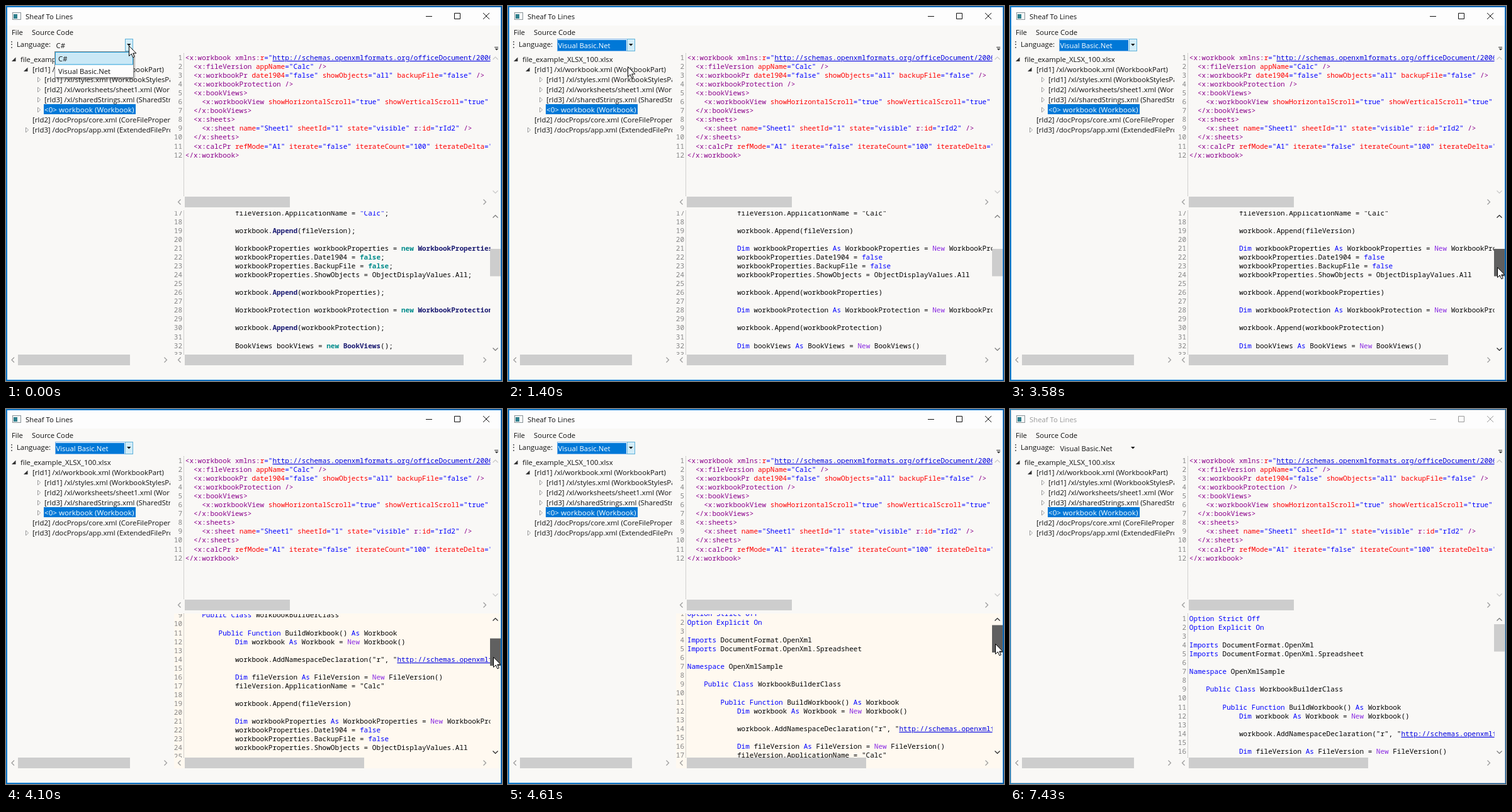
An HTML page for the animation above (7.53 s loop, 788 by 596 pixels).

```html
<!DOCTYPE html>
<html lang="en">
<head>
<meta charset="utf-8">
<title>Sheaf To Lines</title>
<style>
  html, body { margin: 0; width: 100%; height: 100%; overflow: hidden; }
  svg { display: block; width: 788px; height: 596px; }
  text { white-space: pre; }
  .ui { font: 11.3px "Open Sans", "Noto Sans", sans-serif; }
  .code { font: 11px "Noto Sans Mono", "DejaVu Sans Mono", monospace; }
  .num { fill: #858585; text-anchor: end; }
</style>
</head>
<body>
<svg id="stage" viewBox="0 0 788 596" xmlns="http://www.w3.org/2000/svg">
  <defs>
    <linearGradient id="edge" x2="1" y2="0">
      <stop offset="0" stop-color="#0a78bd"/>
      <stop offset="1" stop-color="#0b4f8c"/>
    </linearGradient>
    <clipPath id="treeClip"><path d="M2 75H261V554H2z"/></clipPath>
    <clipPath id="xmlClip"><path d="M262 75H769.5V303H262z"/></clipPath>
    <clipPath id="codeClip"><path d="M262 326H769.5V554H262z"/></clipPath>
  </defs>
</svg>
<script>
const LOOP = 7530, LINE = 14.05, BG = '#f9f8f6', THUMB = '#cdcdcd';
const stage = document.getElementById('stage');

function add(parent, tag, attrs = {}, content) {
  const el = document.createElementNS(stage.namespaceURI, tag);
  for (const k in attrs) el.setAttribute(k, attrs[k]);
  if (content !== undefined) el.textContent = content;
  parent.appendChild(el);
  return el;
}
const group = (parent, attrs) => add(parent, 'g', attrs);
const rect = (parent, x, y, width, height, fill, extra) =>
  add(parent, 'rect', { x, y, width, height, fill, ...extra });
const path = (parent, d, fill = 'none', stroke = 'none', extra) =>
  add(parent, 'path', { d, fill, stroke, ...extra });
const label = (parent, x, y, s, fill = '#111', extra) =>
  add(parent, 'text', { x, y, fill, class: 'ui', ...extra }, s);
const show = (el, on) => el.setAttribute('display', on ? 'inline' : 'none');

// Syntax colouring: the first matching rule in each list wins.
const LINK = ['http:[^"]*', '#0000e0', 'link'];
const xmlRules = [
  LINK,
  ['"(?!http)[^"]*"|["=]', '#0000ff'],
  ['[\\w.-]+(?=\\s*=)', '#ff0000'],
  ['[^\\s"=]+?(?=[\\s:]|$)|[^\\s"=]', '#8b008b']
];
const vbRules = [
  LINK,
  ['\\bNew\\b', '#8a2be2'],
  ['\\b(?:Option|Strict|Explicit|Off|On|Imports|Namespace|Public|Class|Function|As|Dim|false)\\b', '#0000ff']
];
const csRules = [
  ['"[^"]*"', '#0000ff'],
  ['\\b(?:new|false)\\b', '#008b8b', 'bold'],
  ['\\w+(?=\\()', '#191970', 'bold']
];

function codeLine(parent, s, y, rules) {
  const text = add(parent, 'text', { x: 284.8, y, class: 'code', fill: '#000' });
  const re = new RegExp(rules.map(r => `(${r[0]})`).join('|'), 'g');
  let end = 0;
  for (const m of s.matchAll(re)) {
    if (m.index > end) add(text, 'tspan', {}, s.slice(end, m.index));
    const [, fill, kind] = rules[m.slice(1).findIndex(Boolean)];
    const style = kind === 'link' ? { 'text-decoration': 'underline' }
      : kind === 'bold' ? { 'font-weight': 700 } : {};
    add(text, 'tspan', { fill, ...style }, m[0]);
    end = m.index + m[0].length;
  }
  if (end < s.length) add(text, 'tspan', {}, s.slice(end));
}
function listing(parent, lines, y0, rules, first = 1) {
  lines.forEach((s, i) => {
    const y = Math.round(y0 + (first - 1 + i) * LINE);
    add(parent, 'text', { x: 280, y, class: 'code num' }, first + i);
    if (s) codeLine(parent, s, y, rules);
  });
}

// Window frame, title bar and menu
rect(stage, 0, 0, 788, 596, 'url(#edge)');
const frame = rect(stage, 1, 1, 786, 594, '#0078d7');
rect(stage, 2, 2, 784, 592, BG);
rect(stage, 2, 2, 784, 29, '#fdfdfd');
rect(stage, 10.5, 10.5, 13, 11, '#f4f6f6', { stroke: '#8a9499' });
rect(stage, 12, 13, 6, 7, '#2f7f8c');
const title = label(stage, 31, 20.5, 'Sheaf To Lines');
const buttons = path(stage, 'M667 16.5H677M712.5 11.5H721.5V20.5H712.5zM758 11L768 21M768 11L758 21');
label(stage, 9, 46, 'File');
label(stage, 41, 46, 'Source Code');

// Toolbar
for (const y of [56, 60, 65]) rect(stage, 8, y, 2, 2, '#777');
label(stage, 17, 65, 'Language:');
path(stage, 'M776 65.5H782', 'none', '#333');
path(stage, 'M776.5 67.5H782.5L779.5 70.5z', '#333');

// Document tree
const tree = group(stage, { 'clip-path': 'url(#treeClip)' });
rect(tree, 60, 156, 146, 16, '#0078d7');
[
  [0, 1, 'file_example_XLSX_100.xlsx'],
  [1, 1, '[rId1] /xl/workbook.xml (WorkbookPart)'],
  [2, 0, '[rId1] /xl/styles.xml (WorkbookStylesPart)'],
  [2, 0, '[rId2] /xl/worksheets/sheet1.xml (WorksheetPart)'],
  [2, 0, '[rId3] /xl/sharedStrings.xml (SharedStringTablePart)'],
  [2, 0, '<0> workbook (Workbook)'],
  [1, -1, '[rId2] /docProps/core.xml (CoreFilePropertiesPart)'],
  [1, 0, '[rId3] /docProps/app.xml (ExtendedFilePropertiesPart)']
].forEach(([depth, open, s], i) => {
  const x = 23 + depth * 19, y = 89 + i * 16, picked = i === 5;
  label(tree, x, y, s, picked ? '#fff' : '#111', picked ? { style: 'font-size:11.6px' } : {});
  if (open > 0) path(tree, `M${x - 7.5} ${y - 7.5}v6.5h-6.5z`, '#333');
  if (open === 0) path(tree, `M${x - 10.5} ${y - 8}v8l4 -4z`, '#fff', '#999');
});

// XML pane
const xml = group(stage, { 'clip-path': 'url(#xmlClip)' });
listing(xml, [
  '<x:workbook xmlns:r="http://schemas.openxmlformats.org/officeDocument/2006/relationships"',
  '  <x:fileVersion appName="Calc" />',
  '  <x:workbookPr date1904="false" showObjects="all" backupFile="false" />',
  '  <x:workbookProtection />',
  '  <x:bookViews>',
  '    <x:workbookView showHorizontalScroll="true" showVerticalScroll="true" ',
  '  </x:bookViews>',
  '  <x:sheets>',
  '    <x:sheet name="Sheet1" sheetId="1" state="visible" r:id="rId2" />',
  '  </x:sheets>',
  '  <x:calcPr refMode="A1" iterate="false" iterateCount="100" iterateDelta="0.001"',
  '</x:workbook>'
], 86, xmlRules);

// Source pane
const tint = rect(stage, 267, 325, 519, 246, '#fff9f0');
const cleanTrack = rect(stage, 769, 332, 17, 217, '#f6f5f4');
const pane = group(stage, { 'clip-path': 'url(#codeClip)' });
const csharp = group(pane), basic = group(pane);
const body = '            ';
listing(csharp, [
  'fileVersion.ApplicationName = "Calc";', '',
  'workbook.Append(fileVersion);', '',
  'WorkbookProperties workbookProperties = new WorkbookProperties();',
  'workbookProperties.Date1904 = false;',
  'workbookProperties.BackupFile = false;',
  'workbookProperties.ShowObjects = ObjectDisplayValues.All;', '',
  'workbook.Append(workbookProperties);', '',
  'WorkbookProtection workbookProtection = new WorkbookProtection();', '',
  'workbook.Append(workbookProtection);', '',
  'BookViews bookViews = new BookViews();', ''
].map(s => s && body + s), 337, csRules, 17);
listing(basic, [
  'Option Strict Off', 'Option Explicit On', '',
  'Imports DocumentFormat.OpenXml', 'Imports DocumentFormat.OpenXml.Spreadsheet', '',
  'Namespace OpenXmlSample', '',
  '    Public Class WorkbookBuilderClass', '',
  '        Public Function BuildWorkbook() As Workbook',
  ...[
    'Dim workbook As Workbook = New Workbook()', '',
    'workbook.AddNamespaceDeclaration("r", "http://schemas.openxmlformats.org/officeDocument"', '',
    'Dim fileVersion As FileVersion = New FileVersion()',
    'fileVersion.ApplicationName = "Calc"', '',
    'workbook.Append(fileVersion)', '',
    'Dim workbookProperties As WorkbookProperties = New WorkbookProperties()',
    'workbookProperties.Date1904 = false',
    'workbookProperties.BackupFile = false',
    'workbookProperties.ShowObjects = ObjectDisplayValues.All', '',
    'workbook.Append(workbookProperties)', '',
    'Dim workbookProtection As WorkbookProtection = New WorkbookProtection()', '',
    'workbook.Append(workbookProtection)', '',
    'Dim bookViews As BookViews = New BookViews()', ''
  ].map(s => s && body + s)
], 337, vbRules);
path(stage, 'M282.5 75V303M282.5 325V554', 'none', '#a8a8a8', { 'stroke-dasharray': '1 1' });

// Scroll bars
const chevron = (x, y, dx, dy, stroke) => path(stage,
  dx ? `M${x - dx * 2} ${y - 4}l${dx * 4} 4l${-dx * 4} 4` : `M${x - 4} ${y - dy * 2}l4 ${dy * 4}l4 ${-dy * 4}`,
  'none', stroke, { 'stroke-width': 1.2 });
for (const [x0, x1, y] of [[11, 253.5, 562.5], [275.5, 760.5, 311.5], [275.5, 760.5, 562.5]]) {
  chevron(x0, y, -1, 0, '#999');
  chevron(x1, y, 1, 0, '#999');
}
chevron(777.5, 83, 0, -1, '#c8c8c8');
chevron(777.5, 295.5, 0, 1, '#c8c8c8');
const arrows = [chevron(777.5, 334.5, 0, -1), chevron(777.5, 545.5, 0, 1)];
rect(stage, 19, 554, 178, 17, THUMB);
rect(stage, 284, 303, 167, 17, THUMB);
const hThumb = rect(stage, 284, 554, 443, 17, THUMB);
const vThumb = rect(stage, 769, 386, 17, 43.5, THUMB);

// Combo box and its drop-down
const combo = group(stage);
rect(combo, 78.5, 52.5, 123, 19, '#fff', { stroke: '#7eb4ea' });
rect(combo, 79, 54, 109, 17, '#0078d7');
const comboText = label(stage, 79.5, 66.5, 'C#');
const button = rect(stage, 189.5, 52.5, 12, 19, '#d3edf8', { stroke: '#5fb2da' });
path(stage, 'M192 60H198.5L195.25 63.5z', '#111');

const popup = group(stage);
for (let i = 4; i > 0; i--) rect(popup, 80, 76, 122 + i, 38 + i, '#000', { opacity: .09, rx: 2 });
rect(popup, 77.5, 72.5, 125, 41, '#fdfdfd', { stroke: '#8c8c8c' });
const items = ['C#', 'Visual Basic.Net'].map((s, i) => {
  const box = rect(popup, 78.5, 73.5 + i * 20, 123, 19.5, 'none');
  label(popup, 83, 87.5 + i * 20.3, s);
  return box;
});
function paintItem(i, fill, stroke) {
  items[i].setAttribute('fill', fill);
  items[i].setAttribute('stroke', stroke);
}

const cursor = path(stage, 'M.5 .5V16.5L4.2 13L6.8 18.8L9.2 17.7L6.7 12.1H11.8z', '#fff', '#000');

// Stepped tracks: [start time, value...]
const pointer = [
  [0, 195, 63], [150, 195, 77], [270, 195, 90], [420, 193, 95], [540, 191, 96], [690, 190, 96],
  [1990, 404, 182], [2140, 605, 320], [2290, 742, 391], [2440, 756, 407], [2750, 761, 407],
  [2900, 770, 412], [3020, 774, 415], [4760, 773, 369], [4910, 773, 367], [5060, 773, 364],
  [5210, 774, 363], [5790, 781, 363]
];
const thumbTop = [
  [0, 386], [3980, 376], [4100, 364.6], [4250, 360], [4370, 354], [4490, 348],
  [4610, 343.5], [4760, 342]
];
const at = (track, t) => track.reduce((now, key) => key[0] <= t ? key : now);

function draw(t) {
  const vb = t >= 1400, scrolled = t >= 3980, idle = t >= 7430;
  const hover = t >= 2900 && t < 5910, drag = t >= 3580 && t < 5210;
  const top = at(thumbTop, t)[1];

  frame.setAttribute('fill', idle ? '#9fb4c4' : '#0078d7');
  title.setAttribute('fill', idle ? '#999' : '#111');
  buttons.setAttribute('stroke', idle ? '#999' : '#111');

  show(combo, vb && !idle);
  show(button, !idle);
  show(popup, !vb);
  comboText.textContent = vb ? 'Visual Basic.Net' : 'C#';
  comboText.setAttribute('fill', vb && !idle ? '#fff' : '#111');
  if (t < 150) paintItem(0, '#cae8f6', '#26a0da');
  else if (t < 420) paintItem(0, '#d1e8ff', '#66a7e8');
  else paintItem(0, '#f4f4f4', '#dadada');
  if (t < 420) paintItem(1, 'none', 'none');
  else paintItem(1, '#b7e0f3', '#26a0da');

  show(csharp, !vb);
  show(basic, vb);
  const shift = `translate(0 ${-Math.round((top - 342) * 5.2)})`;
  csharp.setAttribute('transform', shift);
  basic.setAttribute('transform', shift);
  show(tint, scrolled && !idle);
  show(cleanTrack, t >= 5910 && !idle);

  hThumb.setAttribute('width', scrolled ? 285 : vb ? 412 : 443);
  vThumb.setAttribute('y', top);
  vThumb.setAttribute('fill', drag ? '#606060' : hover ? '#a6a6a6' : THUMB);
  arrows.forEach(a => a.setAttribute('stroke', hover ? '#222' : '#777'));

  let [, x, y] = at(pointer, t);
  if (t >= 3980 && t < 4760) y = Math.round(top + 29);
  cursor.setAttribute('transform', `translate(${x} ${y})`);
  show(cursor, t < 5910);
}

const start = performance.now();
function tick() {
  draw((performance.now() - start) % LOOP);
  requestAnimationFrame(tick);
}
tick();
</script>
</body>
</html>
```
